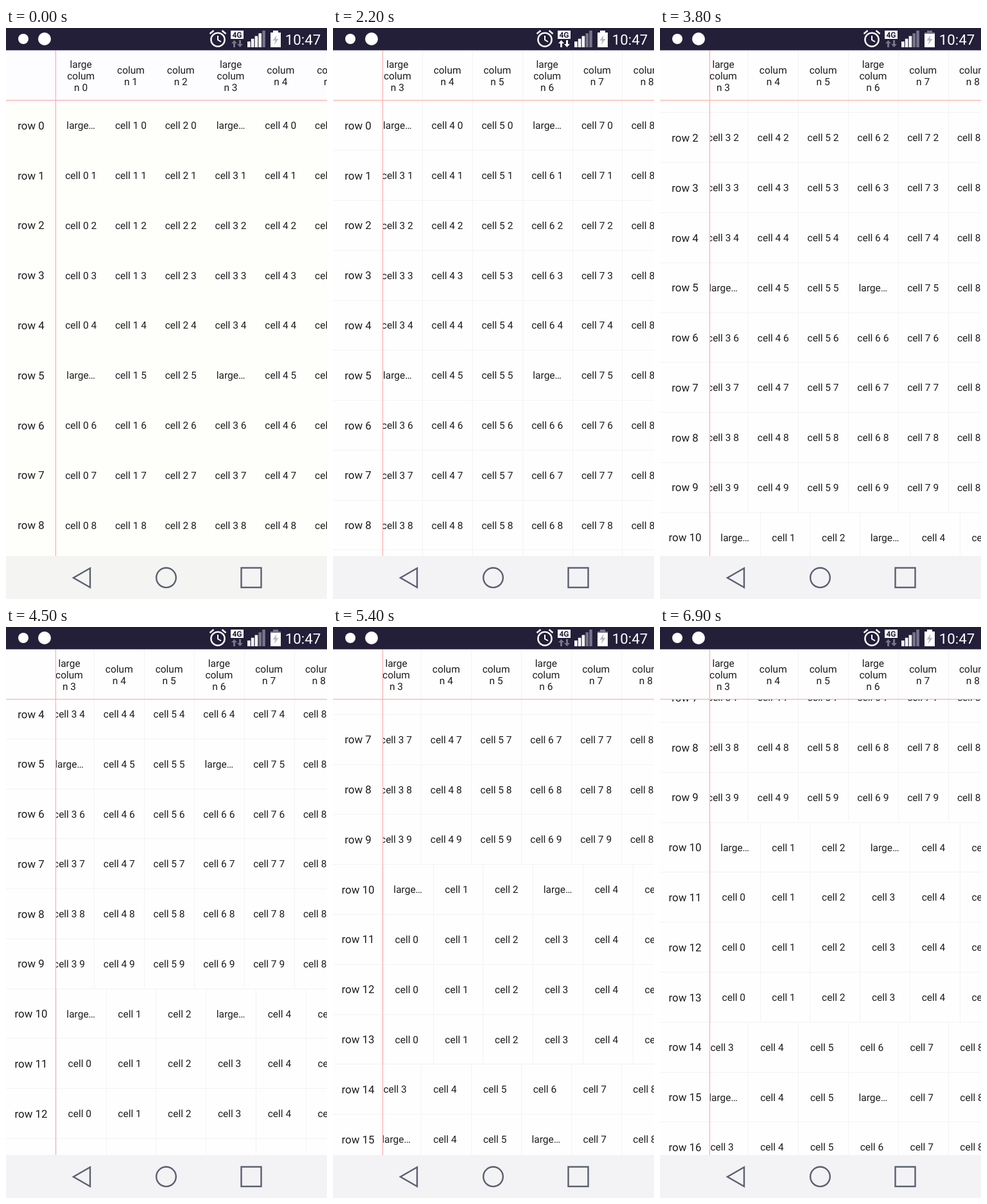
Animation of 500 by 889 pixels, one loop 7 s. Source, as an HTML page with a canvas:

```html
<!DOCTYPE html>
<html lang="en">
<head>
<meta charset="utf-8">
<title>Scrolling table</title>
<style>
html, body { margin: 0; width: 100%; height: 100%; overflow: hidden; background: #fff; }
canvas { display: block; }
</style>
</head>
<body>
<canvas id="stage" width="500" height="889"></canvas>
<script>
const c = document.getElementById('stage').getContext('2d');
c.textRendering = 'geometricPrecision';
const LOOP = 7000, CELL = 77.78, TOP = 112.4, BOTTOM = 822;
const SMALL = 15.5, LARGE = 16.9, LEADING = 1.172 * SMALL;
const GRID = '#f3f2f5', INK = '#1c1c1e', BAR = '#231f39', DIM = '#77748a';

// Keys: time in s, position in px, speed in px/s
const scrollX = [[1.3, 0, 200], [1.4, 24.5, 290], [2.2, 249.7, 20], [2.4, 251.5, 0]];
const scrollY = [[3.3, 0, 220], [3.8, 136.5, 291], [4.5, 327.5, 255], [5.4, 521, 175], [6.1, 586.5, 0]];

function glide(keys, t) {
  if (t <= keys[0][0]) return keys[0][1];
  const i = keys.findIndex(k => k[0] > t);
  if (i < 0) return keys[keys.length - 1][1];
  const [t0, p0, v0] = keys[i - 1], [t1, p1, v1] = keys[i];
  const d = t1 - t0, u = (t - t0) / d, w = 1 - u;
  return w * w * ((1 + 2 * u) * p0 + u * d * v0) + u * u * ((3 - 2 * u) * p1 - w * d * v1);
}

function box(x, y, w, h, color) {
  c.fillStyle = color;
  c.fillRect(x, y, w, h);
}

// Text centred on x, with its line box centred on y
function label(text, x, y, size, color = INK, weight = '') {
  c.font = `${weight} ${size}px Roboto, sans-serif`;
  c.textAlign = 'center';
  c.fillStyle = color;
  c.fillText(text, x, y + 0.392 * size);
}

function path(points, color, width) {
  c.beginPath();
  points.forEach(([x, y]) => c.lineTo(x, y));
  c.fillStyle = c.strokeStyle = color;
  c.lineWidth = width || 1;
  width ? c.stroke() : c.fill();
}

function circle(x, y, r, color, width) {
  c.beginPath();
  c.arc(x, y, r, 0, 7);
  c.fillStyle = c.strokeStyle = color;
  c.lineWidth = width || 1;
  width ? c.stroke() : c.fill();
}

function clipped(x, y, w, h, draw) {
  c.save();
  c.beginPath();
  c.rect(x, y, w, h);
  c.clip();
  draw();
  c.restore();
}

// Calls draw(column, left edge) for the columns in view
function columns(x, draw) {
  const first = Math.floor(x / CELL);
  for (let n = first; n < first + 7; n++) draw(n, CELL * (n + 1) - x);
}

function header(x, grid) {
  columns(x, (n, left) => {
    const lines = [...(n % 3 ? [] : ['large']), 'colum', 'n ' + n];
    const y = 74 - (lines.length - 1) * LEADING / 2;
    lines.forEach((s, i) => label(s, left + CELL / 2, y + i * LEADING, SMALL));
    if (grid) box(Math.round(left), 35, 1, 77, GRID);
  });
}

function row(r, top, x, grid) {
  const y = top + CELL / 2;
  label('row ' + r, 39, y, LARGE);
  if (grid) box(0, Math.round(top + CELL), 500, 1, GRID);
  clipped(77, 112, 423, 710, () => columns(r > 9 && r < 14 ? 0 : x, (n, left) => {
    const mid = left + CELL / 2;
    if (grid) box(Math.round(left), top, 1, CELL, GRID);
    if (n % 3 === 0 && r % 5 === 0) label('large…', mid, y, SMALL);
    else if (r > 9) label('cell ' + n, mid - 1.9, y, SMALL);
    else label(`cell ${n} ${r}`, mid, y, SMALL);
  }));
}

function statusBar(ms) {
  box(0, 0, 500, 34.7, BAR);
  circle(27, 17, 8, '#fff');
  circle(60, 17, 10, '#fff');

  // Alarm
  circle(330, 18.2, 10.6, '#fff', 2.4);
  path([[330, 12], [330, 18.5], [335, 21.5]], '#fff', 2);
  path([[317.5, 9], [323.5, 4]], '#fff', 2.4);
  path([[342.5, 9], [336.5, 4]], '#fff', 2.4);

  // Network
  box(350, 4, 20, 13, '#fff');
  label('4G', 360, 10.3, 12, BAR, 'bold');
  const up = ms >= 2100 && ms < 2900 ? '#fff' : DIM;
  const down = ms >= 1400 && ms < 2900 ? '#fff' : DIM;
  path([[351, 24], [355.5, 19], [360, 24]], up);
  box(354, 23, 3, 7, up);
  path([[360, 25], [364.5, 30], [369, 25]], down);
  box(363, 19, 3, 7, down);
  const bars = ms < 1400 ? 4 : 3;
  for (let i = 0; i < 5; i++) {
    const h = 9 + i * 4.25;
    box(376 + i * 5.8, 30 - h, 4.6, h, i < bars ? '#fff' : DIM);
  }

  // Charging battery with a blinking tip
  const tip = Math.floor((ms + 100) / 500) % 2 ? DIM : '#fff';
  box(416, 4, 8, 3, tip);
  box(412, 7, 16, 2, tip);
  box(412, 9, 16, 21, '#fff');
  path([[421.5, 11], [415.5, 19.5], [419.5, 19.5], [417.5, 26.5], [424.5, 17], [420.5, 17]], '#b9b7c3');

  label('10:47', 462.5, 17.3, 22.3, '#fff');
}

function navBar(color) {
  const ink = '#596070';
  box(0, BOTTOM, 500, 67, color);
  c.beginPath();
  c.moveTo(105, 856);
  c.lineTo(131, 841);
  c.lineTo(131, 871);
  c.closePath();
  c.strokeStyle = ink;
  c.lineWidth = 2.4;
  c.stroke();
  circle(249.5, 855.8, 15.3, ink, 2.4);
  c.strokeRect(366.5, 840.5, 31, 30.5);
}

function draw(ms) {
  const t = ms / 1000, x = glide(scrollX, t), y = glide(scrollY, t);
  const grid = ms >= 1400, rule = grid ? '#ffa5a1' : '#fb9db2';
  box(0, 0, 500, 889, grid ? '#fefefe' : '#fefefb');
  clipped(0, 112, 500, 710, () => {
    const first = Math.floor(y / CELL);
    for (let r = first; r < first + 11; r++) row(r, TOP + r * CELL - y, x, grid);
  });
  box(0, 34, 500, 78, grid ? '#fefefe' : '#fdfcff');
  clipped(77, 35, 423, 77, () => header(x, grid));
  box(77, 35, 1, BOTTOM - 35, rule);
  box(0, 112, 500, 1, rule);
  statusBar(ms);
  navBar(grid ? '#f3f2f5' : '#f4f4f2');
}

const start = performance.now();
function tick() {
  const ms = (performance.now() - start) % LOOP;
  draw(Math.floor(ms / 100) * 100);
  requestAnimationFrame(tick);
}
tick();
</script>
</body>
</html>
```
